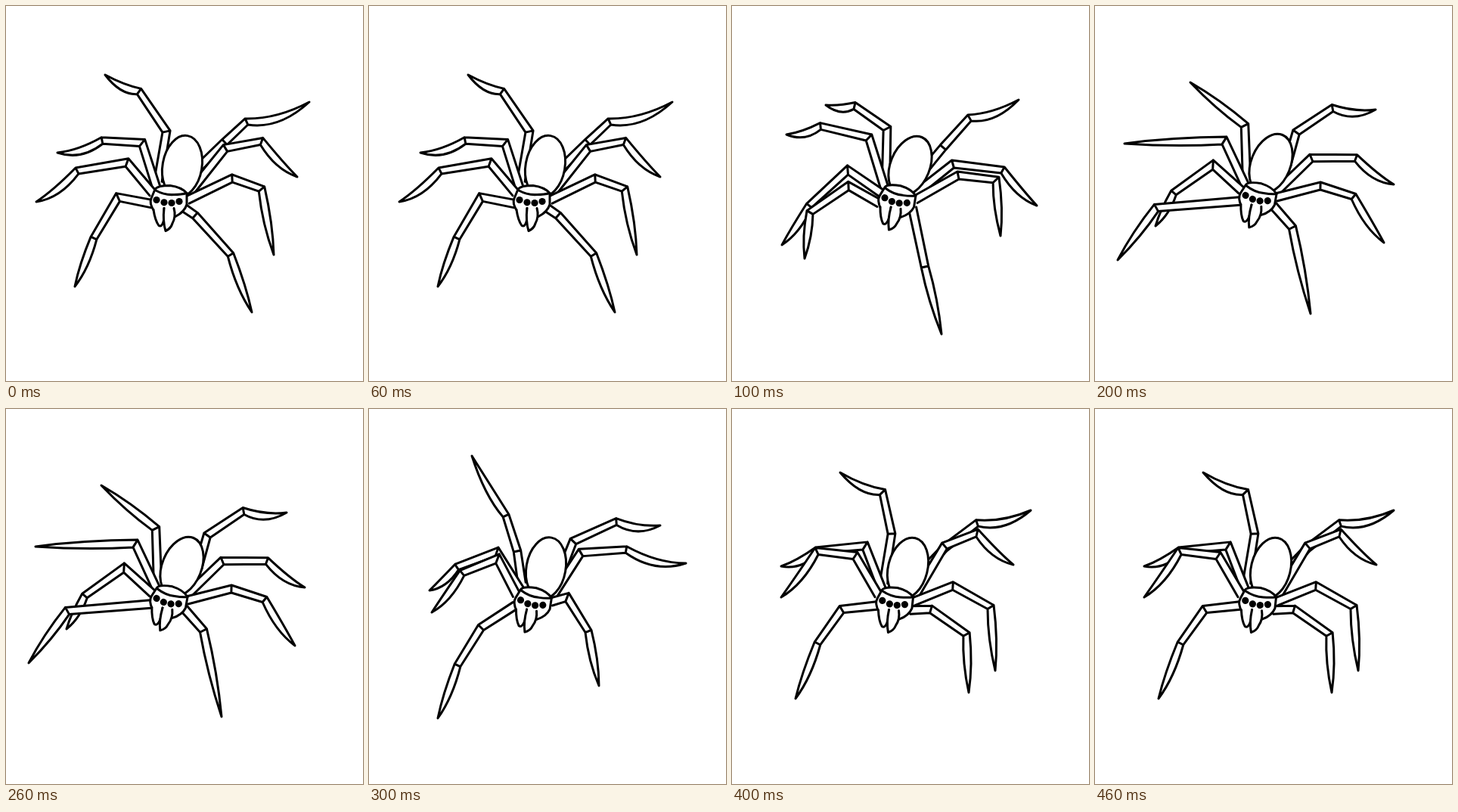
Animation, 472 px wide and 496 px high, one loop 0.5 s. Source, as an HTML page with a canvas:

```html
<!DOCTYPE html>
<html lang="en">
<head>
<meta charset="utf-8">
<title>Walking spider</title>
<style>
  html, body { margin: 0; width: 100%; height: 100%; overflow: hidden; background: #fff; }
  canvas { display: block; }
</style>
</head>
<body>
<canvas id="stage" width="472" height="496"></canvas>
<script>
const ctx = document.getElementById('stage').getContext('2d');
const STEP = 100;
const LEAF_WIDTH = 4.5;
const SAG = 0.1;

// Where the legs meet the body, relative to the eyes: four left, four right, back to front.
const hips = [[-13, -27], [-15, -18], [-20, -11], [-22, 3], [40, -44], [30, -13], [26, -2], [22, 9]];

// Body: eye centre x, y, then head and abdomen tilt in degrees.
// Each leg: knee, ankle (left out when the foot is straight) and tip.
const poses = [];
const addPose = (body, ...legs) => poses.push({ body, legs });

addPose([214, 258.5, 0, 10],
  [212, 166, 176, 113, 131, 91], [180, 181, 127, 178, 68, 194],
  [160, 207, 94, 218, 40, 259], [148, 253, 116, 307, 91, 371],
  [289, 180, 318, 153, 401, 127], [290, 188, 338, 179, 385, 226],
  [299, 228, 338, 242, 354, 329], [250, 277, 297, 329, 325, 405]);

addPose([216.5, 258, 9, 22],
  [205, 162, 162, 132, 124, 131], [181, 174, 117, 159, 72, 170],
  [153, 217, 102, 264, 66, 316], [154, 238, 103, 273, 96, 334],
  [279, 187, 314, 148, 379, 124], [292, 209, 358, 217, 403, 264],
  [299, 224, 349, 230, 355, 304], [255, 345, 277, 434]);

addPose([213.5, 255, 10, 22],
  [198, 158, 126, 101], [171, 178, 39, 182],
  [156, 210, 104, 247, 80, 291], [81, 267, 30, 336],
  [266, 167, 314, 135, 371, 137], [286, 201, 345, 201, 395, 236],
  [298, 238, 342, 252, 382, 313], [261, 293, 285, 407]);

addPose([215, 257, 9, 10],
  [196, 188, 181, 141, 136, 62], [169, 189, 116, 209, 80, 240],
  [170, 198, 123, 217, 83, 269], [148, 289, 117, 339, 91, 409],
  [270, 175, 327, 149, 385, 154], [280, 190, 340, 186, 419, 204],
  [262, 249, 290, 294, 304, 366]);

addPose([213.5, 257, 6, 14],
  [211, 165, 199, 110, 143, 84], [176, 181, 112, 187, 65, 208],
  [163, 194, 112, 188, 65, 249], [145, 265, 113, 310, 84, 383],
  [281, 184, 324, 151, 395, 134], [281, 181, 324, 164, 372, 206],
  [292, 234, 342, 262, 348, 346], [263, 265, 310, 298, 313, 375]);

const radians = degrees => degrees * Math.PI / 180;

function direction(a, b) {
  const dx = b.x - a.x, dy = b.y - a.y, length = Math.hypot(dx, dy);
  return { x: dx / length, y: dy / length };
}

// Legs taper from the hip; the foot is a leaf shape that sags a little.
function buildLeg(hip, keys) {
  const leg = [{ ...hip, width: 5.2 }];
  for (let i = 0; i < keys.length; i += 2) {
    leg.push({ x: keys[i], y: keys[i + 1], width: 4.8 - i * 0.3 });
  }
  const tip = leg.pop(), ankle = leg[leg.length - 1];
  const sag = leg.length > 2 ? SAG * Math.abs(tip.x - ankle.x) : 0;
  leg.push({ x: (ankle.x + tip.x) / 2, y: (ankle.y + tip.y) / 2 + sag, width: LEAF_WIDTH });
  leg.push({ ...tip, width: 0 });
  return leg;
}

// One side of a leg, mitred at the joints.
function legEdge(leg, side) {
  const last = leg.length - 1;
  return leg.map((p, i) => {
    const before = direction(leg[Math.max(i - 1, 0)], leg[Math.max(i, 1)]);
    const after = direction(leg[Math.min(i, last - 1)], leg[Math.min(i + 1, last)]);
    const sx = before.x + after.x, sy = before.y + after.y;
    const scale = side * p.width * 2 / Math.max(sx * sx + sy * sy, 1.5);
    return { x: p.x - sy * scale, y: p.y + sx * scale };
  });
}

// Control point of a quadratic curve from a to b that passes through mid.
const controlThrough = (a, mid, b) => [2 * mid.x - (a.x + b.x) / 2, 2 * mid.y - (a.y + b.y) / 2];

function drawLeg(leg) {
  const left = legEdge(leg, 1), right = legEdge(leg, -1);
  const tip = leg[leg.length - 1], ankle = leg.length - 3;
  ctx.beginPath();
  for (let i = 0; i <= ankle; i++) ctx.lineTo(left[i].x, left[i].y);
  ctx.quadraticCurveTo(...controlThrough(left[ankle], left[ankle + 1], tip), tip.x, tip.y);
  ctx.quadraticCurveTo(...controlThrough(tip, right[ankle + 1], right[ankle]), right[ankle].x, right[ankle].y);
  for (let i = ankle - 1; i >= 0; i--) ctx.lineTo(right[i].x, right[i].y);
  ctx.fill();
  for (let i = 1; i <= ankle; i++) {
    ctx.moveTo(left[i].x, left[i].y);
    ctx.lineTo(right[i].x, right[i].y);
  }
  ctx.stroke();
}

function drawAbdomen(x, y, tilt) {
  ctx.beginPath();
  ctx.ellipse(x + 19, y - 46.5, 26, 41, radians(tilt), 0, Math.PI * 2);
  ctx.fill();
  ctx.stroke();
}

const headShapes = [
  'M-18 13Q-25 3-22-4L-17-16Q-14-21 3-21Q18-19 25-11L25 4Q22 14 10 20',
  'M-17-15Q-4-8 8-9Q18-9 25-11',
  'M-19 11Q-17 25-12 32Q-8 34-6 27Q-4 20-5 9',
  'M-5 9Q-7 26-3 39Q4 36 6 29Q11 20 8 9'
].map(d => new Path2D(d));

function drawHead(x, y, tilt) {
  ctx.save();
  ctx.translate(x, y);
  ctx.rotate(radians(tilt));
  for (const shape of headShapes) {
    ctx.fill(shape);
    ctx.stroke(shape);
  }
  ctx.fillStyle = '#000';
  for (let ex = -15; ex <= 15; ex += 10) {
    ctx.beginPath();
    ctx.arc(ex, 2 - ex * ex / 75 + ex / 15, 4.6, 0, Math.PI * 2);
    ctx.fill();
  }
  ctx.restore();
}

function draw(time) {
  const { body, legs } = poses[Math.floor(time / STEP) % poses.length];
  const [x, y, headTilt, abdomenTilt] = body;
  ctx.fillStyle = '#fff';
  ctx.fillRect(0, 0, 472, 496);
  ctx.strokeStyle = '#000';
  ctx.lineWidth = 3;
  ctx.lineJoin = ctx.lineCap = 'round';
  legs.forEach((keys, i) => {
    const [hx, hy] = hips[i];
    drawLeg(buildLeg({ x: x + hx, y: y + hy }, keys));
  });
  drawAbdomen(x, y, abdomenTilt);
  drawHead(x, y, headTilt);
}

const start = performance.now();
function tick() {
  draw(performance.now() - start);
  requestAnimationFrame(tick);
}
tick();
</script>
</body>
</html>
```
